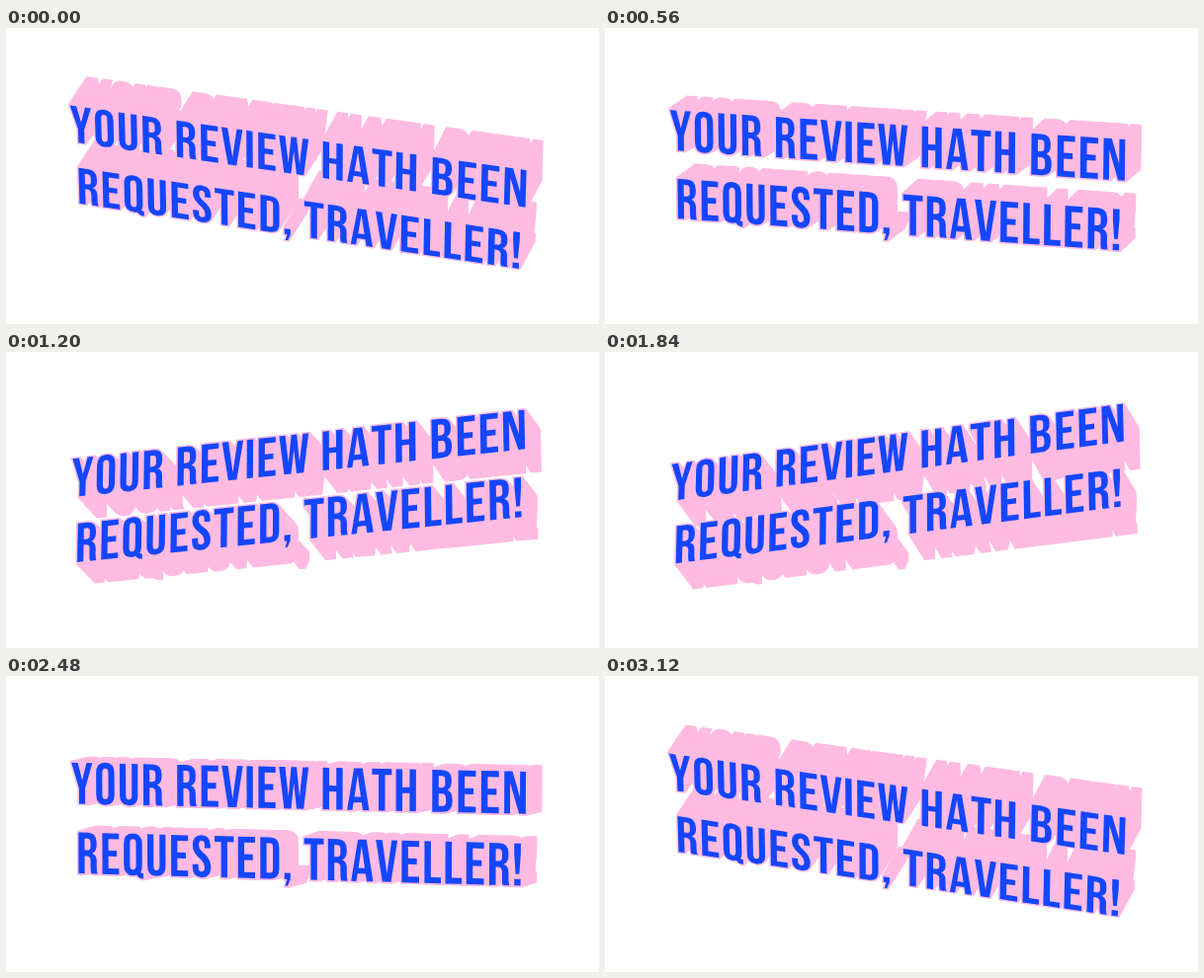
These frames come from a looping animation (600x300 px, 3200 ms). An HTML page with a canvas:

```html
<!DOCTYPE html>
<html lang="en">
<head>
<meta charset="utf-8">
<title>Your review hath been requested, traveller!</title>
<style>
  html, body { margin: 0; width: 100%; height: 100%; overflow: hidden; background: #fff; }
  canvas { display: block; width: 600px; height: 300px; }
</style>
</head>
<body>
<canvas id="stage" width="600" height="300" role="img"
  aria-label="Your review hath been requested, traveller!"></canvas>
<script>
const BLUE = '#1446ff', PINK = '#ffbbe1';
const LOOP = 3200, STEP = 80;
const RAD = Math.PI / 180;
const SWING = 29.2 * RAD, YAW = 16.5 * RAD;
const DEPTH = 60, LAYERS = 40, CAMERA = 4200;
const CENTER = { x: 302.7, y: 147 };
const EM = 0.06, TRACKING = 1.45, LEADING = 71.5, CAP = 42;
const OUTLINE_BACK = 4.8 / EM, OUTLINE_FRONT = 3.2 / EM;

// Condensed capitals: advance width and outline, cap height 700 units, y down.
const GLYPHS = {
  ' ': [150, ''],
  A: [410, 'M131 0H280L396 700H285L265 573H125L105 700H14ZM141 478H250L196 113Z'],
  B: [420, 'M40 0H206Q369 0 369 158V194Q369 300 298 332Q384 365 384 482V536Q384 700 219 700H40ZM150 100V295H193Q260 295 260 238V165Q260 100 203 100ZM150 395V600H219Q274 600 274 538V478Q274 395 206 395Z'],
  D: [406, 'M40 0H215Q372 0 372 170V530Q372 700 215 700H40ZM150 100V600H213Q262 600 262 538V162Q262 100 213 100Z'],
  E: [368, 'M40 0H340V100H150V295H301V395H150V600H340V700H40Z'],
  H: [424, 'M40 0H150V300H274V0H384V700H274V400H150V700H40Z'],
  I: [176, 'M33 0H143V700H33Z'],
  L: [334, 'M40 0H150V600H322V700H40Z'],
  N: [444, 'M40 0H178L306 423V0H404V700H291L138 193V700H40Z'],
  O: [396, 'M34 168Q34 -10 198 -10Q362 -10 362 168V532Q362 710 198 710Q34 710 34 532ZM144 161V539Q144 610 198 610Q252 610 252 539V161Q252 90 198 90Q144 90 144 161Z'],
  Q: [396, 'M34 168Q34 -10 198 -10Q362 -10 362 168V532Q362 610 336 652Q348 668 382 668V762Q300 762 262 698Q235 710 198 710Q34 710 34 532ZM144 161V539Q144 610 198 610Q252 610 252 539V161Q252 90 198 90Q144 90 144 161Z'],
  R: [404, 'M40 0H203Q366 0 366 163V209Q366 320 287 350Q367 376 367 485V590Q367 665 383 700H271Q257 670 257 592V481Q257 400 181 400H150V700H40ZM150 100V300H193Q256 300 256 240V168Q256 100 200 100Z'],
  S: [384, 'M345 168V212H241V161Q241 90 190 90Q139 90 139 159Q139 215 188 265L262 331Q353 418 353 533Q353 710 190 710Q27 710 27 533V488H131V541Q131 610 187 610Q243 610 243 541Q243 475 190 422L118 356Q29 270 29 166Q29 -10 190 -10Q345 -10 345 168Z'],
  T: [360, 'M10 0H350V100H235V700H125V100H10Z'],
  U: [396, 'M36 0H146V540Q146 610 199 610Q252 610 252 540V0H360V534Q360 710 198 710Q36 710 36 534Z'],
  V: [390, 'M8 0H119L200 559L281 0H382L270 700H120Z'],
  W: [536, 'M10 0H117L173 500L222 0H318L368 500L424 0H526L440 700H316L268 268L220 700H98Z'],
  Y: [390, 'M5 0H120L198 300L276 0H381L250 436V700H140V436Z'],
  ',': [172, 'M33 594H139V694L92 815H48L80 700H33Z'],
  '!': [180, 'M34 0H146V170L122 508H58L34 170ZM36 594H144V700H36Z']
};
const LINES = ['YOUR REVIEW HATH BEEN', 'REQUESTED, TRAVELLER!'];

const ctx = document.getElementById('stage').getContext('2d');
const outlines = Object.fromEntries(
  Object.entries(GLYPHS).map(([char, [, d]]) => [char, new Path2D(d)]));
const letters = LINES.flatMap(layOut);

function layOut(text, row) {
  const advance = char => GLYPHS[char][0] * EM + TRACKING;
  const width = [...text].reduce((sum, char) => sum + advance(char), 0);
  const y = row * LEADING - (LEADING + CAP) / 2;
  let pen = -width / 2;
  return [...text].map(char => {
    const letter = { shape: outlines[char], x: pen, y, mid: GLYPHS[char][0] / 2 };
    pen += advance(char);
    return letter;
  });
}

function project(x, y, z, pitch) {
  const turnedX = x * Math.cos(YAW) - z * Math.sin(YAW);
  const turnedZ = z * Math.cos(YAW) + x * Math.sin(YAW);
  const tiltedY = y * Math.cos(pitch) + turnedZ * Math.sin(pitch);
  const tiltedZ = turnedZ * Math.cos(pitch) - y * Math.sin(pitch);
  const scale = CAMERA / (CAMERA - tiltedZ);
  return [CENTER.x + turnedX * scale, CENTER.y + tiltedY * scale];
}

// Affine approximation of the perspective around the middle of a letter.
function placeLetter({ x, y, mid }, z, pitch) {
  const at = (u, v) => project(x + u * EM, y + v * EM, z, pitch);
  const slope = (p, q) => [(q[0] - p[0]) / 700, (q[1] - p[1]) / 700];
  const [a, b] = slope(at(mid - 350, 350), at(mid + 350, 350));
  const [c, d] = slope(at(mid, 0), at(mid, 700));
  const [cx, cy] = at(mid, 350);
  ctx.setTransform(a, b, c, d, cx - a * mid - c * 350, cy - b * mid - d * 350);
}

function drawLayer(z, pitch, color, outline) {
  ctx.fillStyle = ctx.strokeStyle = color;
  ctx.lineWidth = outline || 1;
  for (const letter of letters) {
    placeLetter(letter, z, pitch);
    ctx.fill(letter.shape, 'evenodd');
    if (outline) ctx.stroke(letter.shape);
  }
}

function draw(time) {
  const pitch = SWING * Math.cos(2 * Math.PI * time / LOOP);
  ctx.setTransform(1, 0, 0, 1, 0, 0);
  ctx.fillStyle = '#fff';
  ctx.fillRect(0, 0, 600, 300);
  ctx.miterLimit = 3;
  for (let i = 0; i <= LAYERS; i++) {
    const near = i / LAYERS;
    const outline = OUTLINE_BACK + (OUTLINE_FRONT - OUTLINE_BACK) * near;
    drawLayer(DEPTH * (near - 0.5), pitch, PINK, outline);
  }
  drawLayer(DEPTH / 2, pitch, BLUE, 0);
}

let shown = -1;
const start = performance.now();
function tick() {
  const elapsed = (performance.now() - start) % LOOP;
  const time = Math.floor(elapsed / STEP) * STEP;
  if (time !== shown) draw(shown = time);
  requestAnimationFrame(tick);
}
tick();
</script>
</body>
</html>
```
